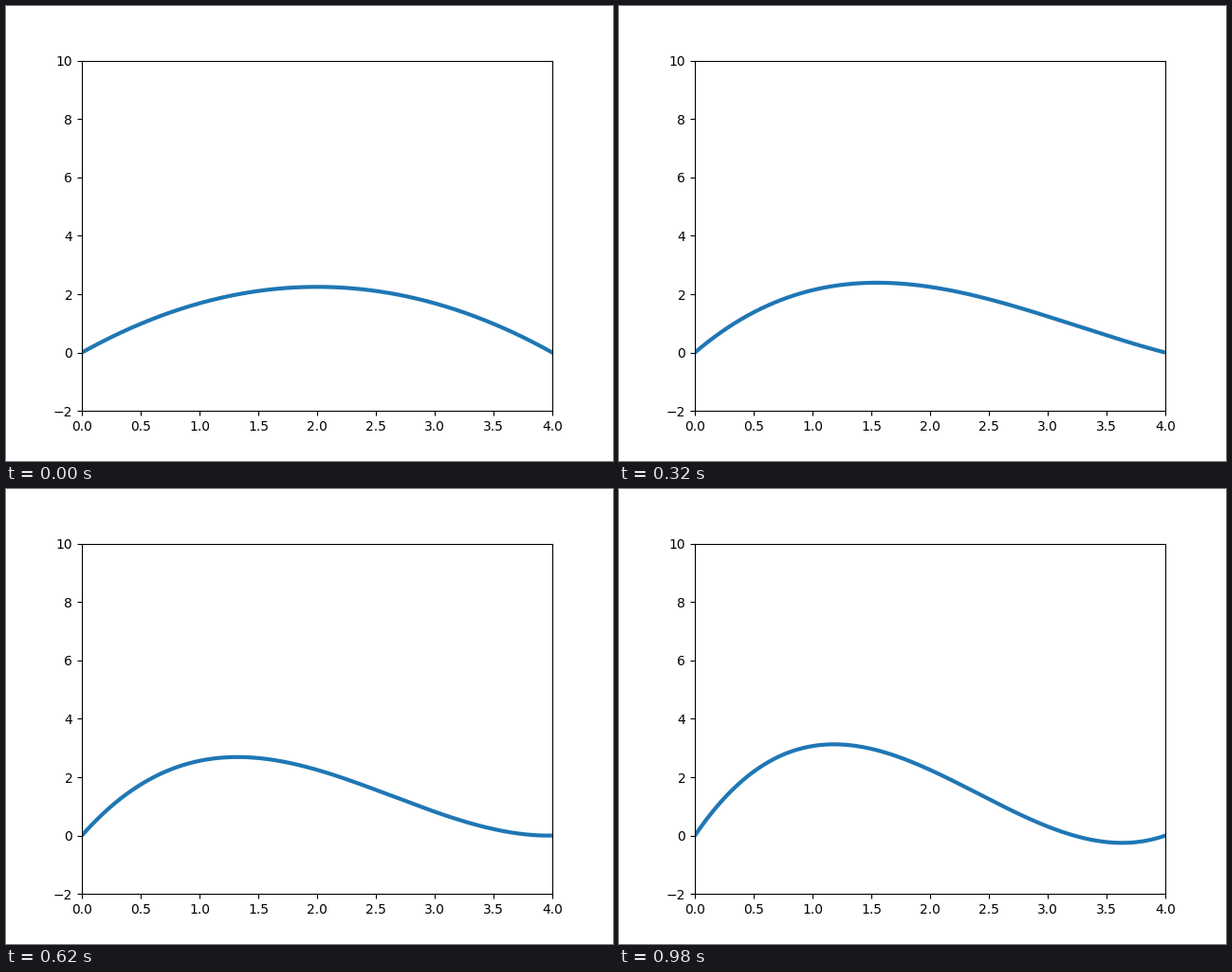
Write a matplotlib script that moves like this. It is 640x480 px and loops after 1000 ms.

```python
import matplotlib.pyplot as plt
import numpy as np
from matplotlib.animation import FuncAnimation

FRAMES = 50
INTERVAL = 20
LIFT_STEP = 0.1

fig = plt.figure(figsize=(6.4, 4.8), dpi=100)
ax = fig.add_subplot(xlim=(0, 4), ylim=(-2, 10))
line, = ax.plot([], [], lw=3)

s = np.linspace(0, 1, 1000)


def bezier(p0, p1, p2, p3):
    r = 1 - s
    return r**3 * p0 + 3 * r**2 * s * p1 + 3 * r * s**2 * p2 + s**3 * p3


x = bezier(0, 4 / 3, 8 / 3, 4)


def update(frame):
    # The inner control points move apart at equal speed.
    lift = LIFT_STEP * frame
    line.set_data(x, bezier(0, 3 + lift, 3 - lift, 0))
    return line,


anim = FuncAnimation(fig, update, frames=FRAMES, interval=INTERVAL,
                     repeat=True, repeat_delay=0)
plt.show()
```
